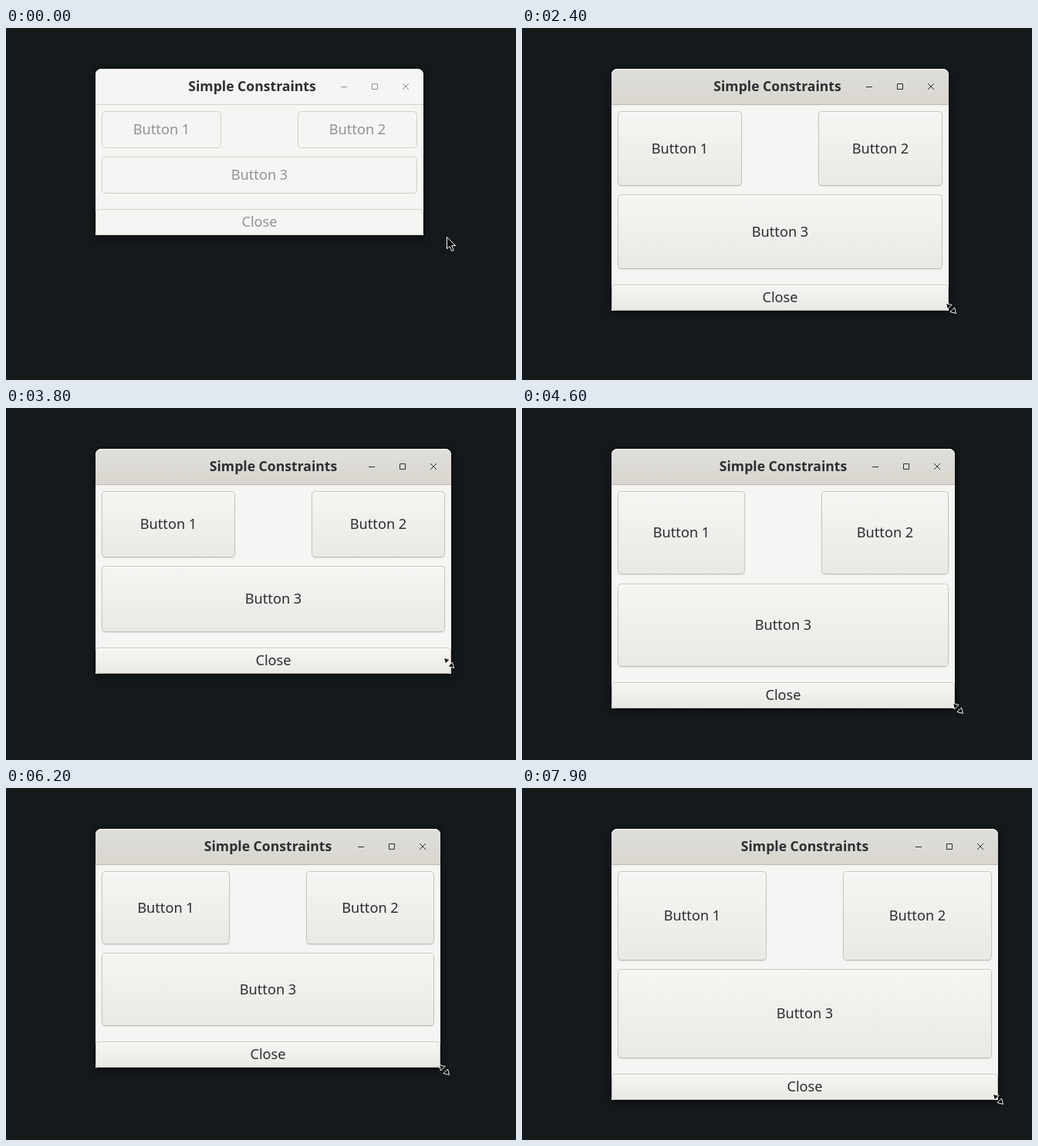
Animation, 661 px wide and 457 px high, one loop 8 s. Source, as an HTML page:

```html
<!DOCTYPE html>
<html lang="en">
<head>
<meta charset="utf-8">
<title>Simple Constraints</title>
<style>
html, body { margin: 0; width: 100%; height: 100%; overflow: hidden; background: #14191b; }
body { position: relative; font: 18.2px "Noto Sans", sans-serif; }
svg { position: absolute; overflow: visible; }
#win {
  --ink: color-mix(in srgb, #2a2f31 var(--focus), #919392);
  --edge: color-mix(in srgb, #c8c6bd var(--focus), #d1d1c8);
  position: absolute; left: 116px; top: 53px;
  color: var(--ink); background: #f5f5f3; border-radius: 8px 8px 0 0;
  box-shadow: 0 2px 8px 1px rgba(0, 0, 0, .5);
}
header {
  position: relative; height: 46px; border-radius: 8px 8px 0 0;
  border-bottom: 1px solid color-mix(in srgb, #c1b9ad var(--focus), #d1d1c8);
  background: linear-gradient(color-mix(in srgb, #dfdedb var(--focus), #f5f5f3),
                              color-mix(in srgb, #d9d6cf var(--focus), #f5f5f3));
  box-shadow: inset 0 1px #fafaf8;
}
h1 {
  position: absolute; left: min(50%, 100% - 222px); transform: translateX(-50%);
  margin: 0; font-size: 17.6px; line-height: 45px; white-space: nowrap; color: #2b3032;
}
header svg { right: 0; top: 0; width: 120px; height: 46px; fill: none; stroke: var(--ink); }
.btn {
  position: absolute; box-sizing: border-box; width: var(--bw); height: var(--bh);
  display: flex; align-items: center; justify-content: center; padding-bottom: 2px;
  border: 1px solid var(--edge); border-radius: 5px;
  border-bottom-color: color-mix(in srgb, #bdbab2 var(--focus), #d1d1c8);
  background: linear-gradient(#f5f5f3, color-mix(in srgb, #e9e9e5 var(--focus), #f5f5f3));
  box-shadow: inset 0 1px color-mix(in srgb, #fff var(--focus), transparent),
              0 1px 2px color-mix(in srgb, rgba(0, 0, 0, .08) var(--focus), transparent);
}
#one { left: 8px; top: 55px; }
#two { right: 8px; top: 55px; }
#three { left: 8px; right: 8px; bottom: 54px; width: auto; }
#close { left: 0; right: 0; bottom: 0; width: auto; height: 34px; }
#cursor { left: 0; top: 0; fill: #000; stroke: #fff; }
</style>
</head>
<body>
<div id="win">
  <header>
    <h1>Simple Constraints</h1>
    <svg><path d="M13 23.5h8M53.5 19.5h7v7h-7zM93 19l8 8m0-8l-8 8"/></svg>
  </header>
  <div class="btn" id="one">Button 1</div>
  <div class="btn" id="two">Button 2</div>
  <div class="btn" id="three">Button 3</div>
  <div class="btn" id="close">Close</div>
</div>
<svg id="cursor" width="1" height="1"><path id="shape"/></svg>
<script>
const LOOP = 8000, STEP = 100, LEFT = 116, TOP = 53;
const ARROW = "M.5.5v15.2l3.5-3.2 2.6 6 2.6-1.1-2.6-5.8h5z";
const RESIZE = "M-6.5-6.5L1-4.5L-4.5 1zM6.5 6.5L-1 4.5L4.5-1z";

// time, window right, window bottom, pointer x, pointer y
const drag = [
  [1700, 544, 276, 541, 268],
  [2000, 541, 315, 546, 335],
  [2300, 552, 380, 557, 382],
  [2500, 556, 352, 558, 348],
  [2700, 588, 398, 597, 406],
  [3000, 596, 363, 592, 349],
  [3200, 575, 300, 570, 285],
  [3600, 578, 400, 589, 407],
  [3900, 575, 320, 566, 300],
  [4300, 556, 345, 554, 358],
  [4600, 561, 390, 565, 390],
  [4800, 588, 365, 593, 345],
  [5000, 580, 310, 575, 295],
  [5200, 568, 355, 572, 362],
  [5600, 563, 318, 552, 295],
  [5800, 545, 285, 545, 280],
  [6100, 556, 375, 562, 386],
  [6300, 572, 340, 576, 335],
  [6500, 600, 335, 610, 350],
  [6700, 612, 385, 617, 398],
  [6900, 610, 405, 603, 405],
  [7100, 596, 360, 596, 340],
  [7500, 611, 425, 615, 432],
  [7700, 612, 412, 614, 409],
  [7900, 617, 405, 617, 404]
];

const slope = (i, c) => {
  const a = drag[i - 1], b = drag[i + 1];
  return a && b ? (b[c] - a[c]) / (b[0] - a[0]) : 0;
};

// Cubic Hermite curve through the drag points
function dragAt(t) {
  const i = Math.max(0, drag.findIndex(p => p[0] >= t) - 1);
  const a = drag[i], b = drag[i + 1], span = b[0] - a[0], u = (t - a[0]) / span;
  return [1, 2, 3, 4].map(c => Math.round(
    a[c] + (b[c] - a[c]) * u * u * (3 - 2 * u) +
    span * u * (1 - u) * (slope(i, c) * (1 - u) - slope(i + 1, c) * u)));
}

function poseAt(t) {
  if (t >= 1700) return dragAt(t);
  const pointer = t < 700 ? [571, 271] : t < 800 ? [565, 269] : t < 900 ? [557, 267]
    : t < 1100 ? [550, 268] : [541, 268];
  return [541, 269, ...pointer];
}

const win = document.getElementById("win");
const shape = document.getElementById("shape");

function draw(now) {
  let t = Math.floor(now % LOOP / STEP) * STEP;
  if (t === 5300 || t === 7800) t -= STEP; // the drag pauses here
  const [right, bottom, x, y] = poseAt(t);
  const width = right - LEFT, height = bottom - TOP;
  const focus = Math.min(1, Math.max(0, (t - 1200) / 300));
  const set = (name, value) => win.style.setProperty(name, value);
  set("width", width + "px");
  set("height", height + "px");
  set("--bw", Math.ceil((width - 116) / 2) + "px");
  set("--bh", Math.ceil((height - 121) / 2) + "px");
  set("--focus", focus * 100 + "%");
  shape.setAttribute("d", t < 900 ? ARROW : RESIZE);
  shape.setAttribute("transform", `translate(${x} ${y})`);
}

const start = performance.now();
(function tick() {
  draw(performance.now() - start);
  requestAnimationFrame(tick);
})();
</script>
</body>
</html>
```
